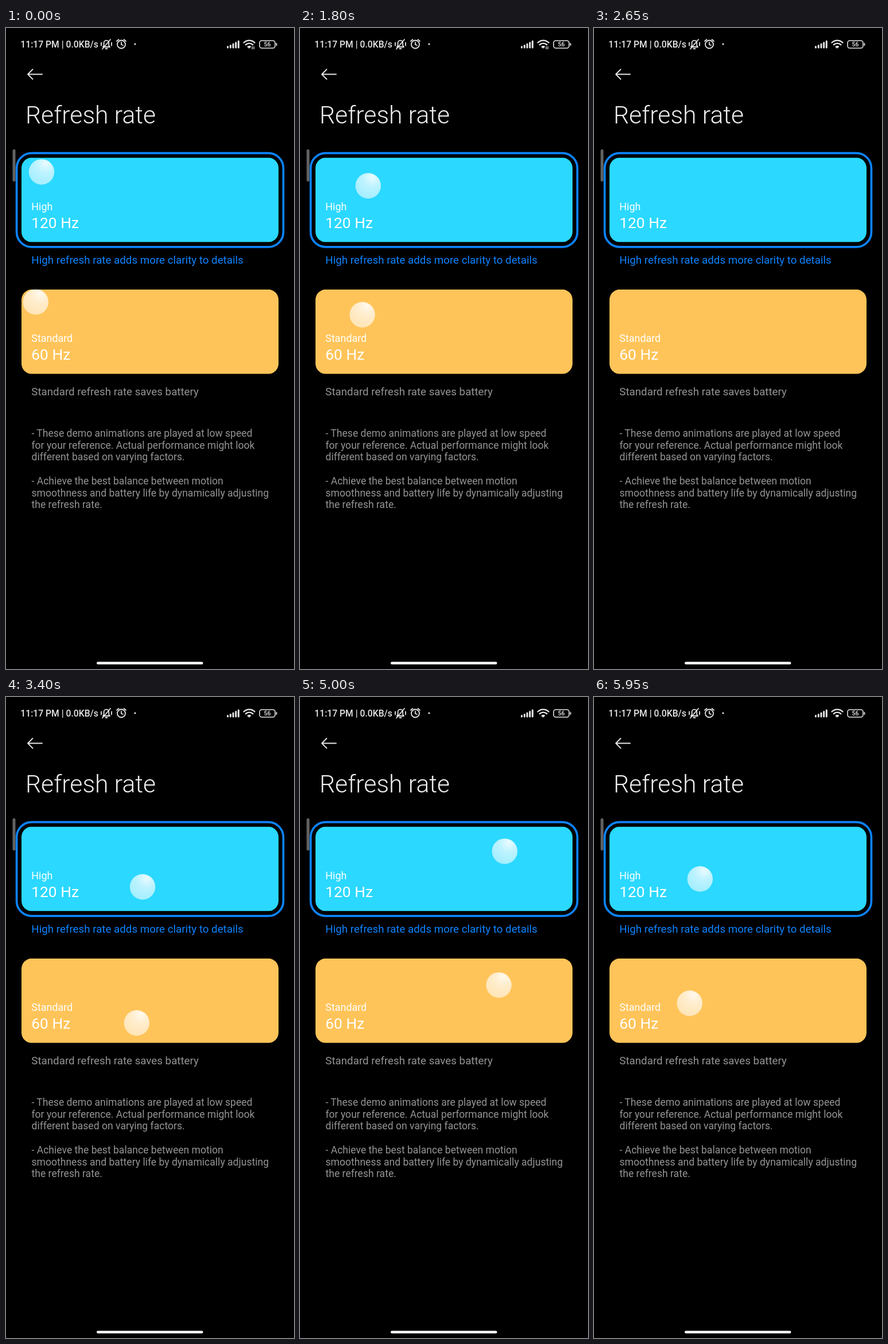
Write an HTML page that moves like this. It is 502 px wide and 1115 px high and loops after 6000 ms.

```html
<!DOCTYPE html>
<html lang="en">
<head>
<meta charset="utf-8">
<title>Refresh rate</title>
<style>
  html, body { margin: 0; width: 100%; height: 100%; overflow: hidden; background: #000; }
  svg { display: block; width: 502px; height: 1115px; font-family: Roboto, sans-serif; }
  .line { fill: none; stroke: #e6e6e6; stroke-linecap: round; stroke-linejoin: round; }
  .label { font-size: 17.9px; fill: #fff; }
  .rate { font-size: 26.3px; fill: #fff; }
  .caption { font-size: 18.75px; }
  .note { font-size: 17.57px; fill: #949494; }
</style>
</head>
<body>
<svg viewBox="0 0 502 1115">
  <defs>
    <radialGradient id="shine" cx=".66" cy=".16" r=".85">
      <stop offset="0" stop-color="#fff" stop-opacity=".9"/>
      <stop offset=".45" stop-color="#fff" stop-opacity=".69"/>
      <stop offset="1" stop-color="#fff" stop-opacity=".57"/>
    </radialGradient>
    <clipPath id="cardShape"><rect width="448" height="147" rx="18"/></clipPath>
  </defs>
  <rect width="502" height="1115"/>

  <!-- status bar -->
  <text x="25.3" y="34" font-size="15.7" font-weight="500" fill="#e6e6e6">11:17 PM | 0.0KB/s</text>
  <g class="line" stroke-width="1.8">
    <path d="M169 33h12l-1.8-2.500v-4.500a4.300 4.300 0 0 0-8.600 0v4.500zM173.500 36h3M168 36.500L182 20M166 25.500v5M184 25.500v5"/>
    <circle cx="201" cy="28.500" r="7"/>
    <path d="M201 25v4l3 1M193 23l3.500-3M209 23l-3.500-3"/>
  </g>
  <circle cx="225" cy="28" r="1.600" fill="#e6e6e6"/>
  <path d="M386.500 34v-1.500M391.300 34v-3.500M396 34v-6M400.700 34v-8.500M405.300 34v-11" class="line" stroke-width="3"/>
  <g class="line" stroke-width="2.400">
    <path d="M414.500 25.500a13.500 13.500 0 0 1 19 0M417.800 29.200a8.800 8.800 0 0 1 12.400 0"/>
    <path d="M421 32.500a4.300 4.300 0 0 1 6 0L424 35z" fill="#e6e6e6" stroke-width="1"/>
  </g>
  <path id="traffic" d="M429.200 36.500v-4M432 32.500v4" class="line" stroke-width="1.300"/>
  <rect x="442" y="22" width="27" height="13" rx="4" class="line" stroke-width="1.600"/>
  <path d="M471.500 27v3" class="line" stroke-width="1.800"/>
  <text x="455.500" y="32.300" font-size="10.500" font-weight="500" fill="#e6e6e6" text-anchor="middle">56</text>

  <!-- header -->
  <path d="M63 80.500H38M46.500 72L38 80.500L46.500 89" class="line" stroke-width="1.800"/>
  <text x="34" y="165.600" font-size="42.700" font-weight="300" fill="#ededed">Refresh rate</text>
  <rect x="11.500" y="211" width="5" height="56" rx="2.500" fill="#626262"/>

  <!-- options -->
  <rect x="18.600" y="217.700" width="464.800" height="163.200" rx="26" fill="#000" stroke="#0d84ff" stroke-width="3.700"/>
  <g transform="translate(27 225.500)" clip-path="url(#cardShape)">
    <rect width="448" height="147" fill="#2bd8ff"/>
    <circle id="fast" r="22.200" fill="url(#shine)"/>
  </g>
  <g transform="translate(27 454.800)" clip-path="url(#cardShape)">
    <rect width="448" height="147" fill="#ffc459"/>
    <circle id="slow" r="22.200" fill="url(#shine)"/>
  </g>
  <text x="44.300" y="317" class="label">High</text>
  <text x="44.300" y="348" class="rate">120 Hz</text>
  <text x="44.300" y="409.500" class="caption" fill="#0d84ff">High refresh rate adds more clarity to details</text>
  <text x="44.300" y="545.800" class="label">Standard</text>
  <text x="44.300" y="577" class="rate">60 Hz</text>
  <text x="44.300" y="638.500" class="caption" fill="#949494">Standard refresh rate saves battery</text>

  <g class="note">
    <text x="44.500" y="711">- These demo animations are played at low speed</text>
    <text x="44.500" y="731.500">for your reference. Actual performance might look</text>
    <text x="44.500" y="752">different based on varying factors.</text>
    <text x="44.500" y="794">- Achieve the best balance between motion</text>
    <text x="44.500" y="814.500">smoothness and battery life by dynamically adjusting</text>
    <text x="44.500" y="835">the refresh rate.</text>
  </g>
  <rect x="158" y="1102.400" width="185.500" height="4.600" rx="2.300" fill="#fff"/>
</svg>
<script>
  const LOOP = 6000, STEP = 50, SPEED = 0.475;
  const PASSES = [1653, 3002, 4352, 5664]; // times at which the ball is fully inside the card
  const CURVE = 0.00171;
  const fast = document.getElementById('fast');
  const slow = document.getElementById('slow');
  const traffic = document.getElementById('traffic');

  // Positions are relative to the card; the first pass starts slowly.
  function ballX(t) {
    if (t < 0) return 35 + t * SPEED;
    if (t < 950) return 35 + t * 264 / 950;
    if (t < 1450) return 299 + (t - 950) * SPEED;
    const start = PASSES.filter(s => t >= s - 200).pop();
    return start === undefined ? -100 : 22 + (t - start) * SPEED;
  }

  // Two arcs that meet at the bounce.
  function ballY(x) {
    return Math.min(119, x < 192.4
      ? 9.1 + CURVE * (x + 61) ** 2
      : 28.1 + CURVE * (x - 422.7) ** 2);
  }

  function place(ball, x) {
    ball.setAttribute('cx', x);
    ball.setAttribute('cy', ballY(x));
  }

  function draw(now) {
    const t = Math.floor((now % LOOP) / STEP) * STEP;
    const held = Math.floor(t * 0.03 + 1e-6) / 0.03; // half-rate updates
    place(fast, ballX(t));
    place(slow, ballX(held - 21.5));
    traffic.style.visibility = t < 2650 ? 'visible' : 'hidden';
  }

  const begin = performance.now();
  function tick() {
    draw(performance.now() - begin);
    requestAnimationFrame(tick);
  }
  tick();
</script>
</body>
</html>
```
